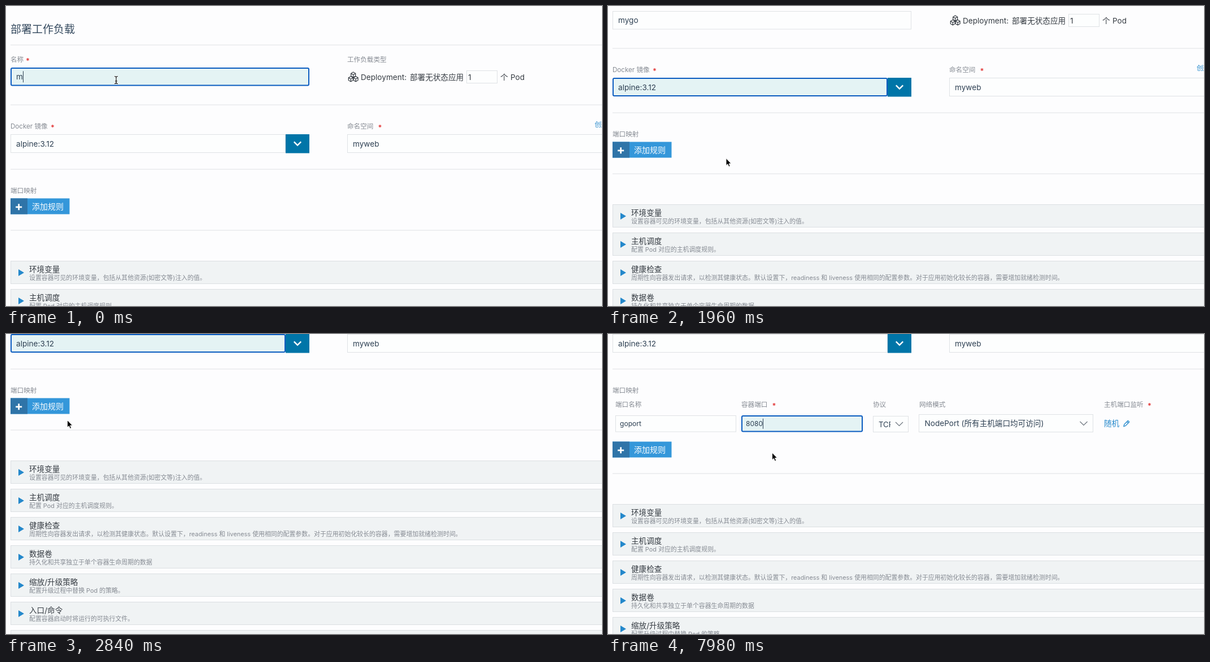
Animation, 1055 px wide and 531 px high, one loop 8000 ms. Source, as an HTML page:

```html
<!DOCTYPE html>
<html lang="zh-CN">
<head>
<meta charset="utf-8">
<title>部署工作负载</title>
<style>
html, body { margin: 0; width: 100%; height: 100%; overflow: hidden; background: #fdfdfe; }
svg { display: block; width: 1055px; height: 531px; }
text { font-family: Inter, "Noto Sans CJK SC", "Noto Sans CJK", sans-serif; white-space: pre; }
</style>
</head>
<body>
<svg id="stage" viewBox="0 0 1055 531"></svg>
<script>
const LOOP = 8000;
const INK = '#2e4053', DARK = '#363c43', GREY = '#868b93', BLUE = '#2488cb';
const LINE = '#dfe2e5', HINT = '#a7adb2';
const stage = document.getElementById('stage');

function add(parent, tag, attrs, content) {
  const el = document.createElementNS('http://www.w3.org/2000/svg', tag);
  for (const k in attrs) el.setAttribute(k, attrs[k]);
  if (content) el.textContent = content;
  parent.appendChild(el);
  return el;
}
// cy is the middle of the line of text
function label(parent, x, cy, size, content, fill = GREY) {
  return add(parent, 'text', { x, y: cy + size * 0.38, 'font-size': size, fill }, content);
}
function rect(parent, x, y, width, height, fill, stroke = 'none') {
  return add(parent, 'rect', { x, y, width, height, fill, stroke });
}
function path(parent, d, stroke, width, fill = 'none') {
  return add(parent, 'path', { d, stroke, 'stroke-width': width, fill });
}
const star = (parent, x, cy) =>
  add(parent, 'text', { x, y: cy + 7, 'font-size': 12.5, 'font-weight': 700, fill: '#e23b3b' }, '*');
const rule = (parent, y) => rect(parent, 8, y, 1047, 1, LINE);
const show = (el, on) => el.setAttribute('visibility', on ? 'visible' : 'hidden');

function field(parent, x, y, w, h, pad, size, hint) {
  const box = add(parent, 'rect', {});
  const hintText = hint ? label(parent, x + pad, y + h / 2, size, hint, HINT) : null;
  const text = label(parent, x + pad, y + h / 2, size, '', INK);
  const tall = size > 13 ? 20 : 18;
  const caret = rect(parent, 0, y + h / 2 - tall / 2, 1, tall, INK);
  return function ({ value, focus, hover, caretAt }) {
    const inset = focus ? 1 : 0.5;
    const look = {
      x: x + inset, y: y + inset, width: w - 2 * inset, height: h - 2 * inset,
      rx: focus ? 2 : 0, 'stroke-width': 2 * inset,
      fill: focus ? '#e4f3f4' : hover ? '#e9eaeb' : '#fdfefe',
      stroke: focus ? '#0b5cc0' : hover ? '#999b9d' : LINE
    };
    for (const k in look) box.setAttribute(k, look[k]);
    if (text.textContent !== value) text.textContent = value;
    if (hintText) {
      hintText.textContent = value ? '' : hint;
      hintText.setAttribute('fill', focus ? '#b9c4c7' : HINT);
    }
    const blinkOn = focus && caretAt >= 0;
    show(caret, blinkOn);
    if (blinkOn) {
      const run = caretAt > 0 ? text.getSubStringLength(0, caretAt) : 0;
      caret.setAttribute('x', Math.round(x + pad + run));
    }
  };
}

// Page
const page = add(stage, 'g', {});
label(page, 8, 41, 19, '部署工作负载', '#34495e');
rule(page, 68.5);
label(page, 8, 95, 11.6, '名称');
star(page, 35, 95);
const nameField = field(page, 8, 109, 529, 32.5, 10, 13.6);

label(page, 604, 95, 11.6, '工作负载类型');
function cube(cx, cy, r) {
  const dx = r * 0.87, h = r / 2;
  path(page, `M${cx} ${cy - r}l${dx} ${h}v${r}l${-dx} ${h}l${-dx} ${-h}v${-r}z` +
    `M${cx - dx} ${cy - h}l${dx} ${h}l${dx} ${-h}M${cx} ${cy}v${r}`, DARK, 1.2);
}
cube(614.7, 121.6, 4.6);
cube(610.3, 129.2, 4.6);
cube(619.1, 129.2, 4.6);
label(page, 628, 126, 13.6, 'Deployment:', DARK);
label(page, 715, 126, 13.6, '部署无状态应用', DARK);
rect(page, 815.5, 114.5, 54, 22, '#fdfefe', LINE);
label(page, 818, 126, 13.6, '1', DARK);
label(page, 875, 126, 13.6, '个', DARK);
label(page, 893, 126, 13.6, 'Pod', DARK);
rule(page, 174.5);

label(page, 8, 213, 11.6, 'Docker 镜像');
star(page, 79, 213);
const imageField = field(page, 8, 227, 487, 33, 10, 13.6);
rect(page, 495, 227, 42, 33.5, '#0075a8');
path(page, 'M509.8 240.3l6.2 6.2l6.2 -6.2', '#fff', 2.4);
label(page, 604, 213, 11.6, '命名空间');
star(page, 658.5, 213);
label(page, 1042, 210, 11.6, '创建新的命名空间', BLUE);
rect(page, 604.5, 227.5, 470, 32, '#fdfefe', LINE);
label(page, 614, 243.5, 13.6, 'myweb', INK);
rule(page, 288.5);
label(page, 8, 326.5, 11.6, '端口映射');

// Port rule row
const row = add(page, 'g', {});
[[13, '端口名称'], [236, '容器端口', 290.5], [469, '协议'], [551, '网络模式'], [878, '主机端口监听', 955]]
  .forEach(([x, s, mark]) => {
    label(row, x, 352, 11.6, s);
    if (mark) star(row, mark, 352);
  });
const portName = field(row, 13, 371, 214, 29.5, 8, 12.1, '例如: myport');
const portNumber = field(row, 236, 371, 215, 29.5, 8, 12.1, '例如: 8080');
rect(row, 469.5, 372.5, 62, 28, '#fdfefe', LINE);
add(add(row, 'clipPath', { id: 'cut' }), 'rect', { x: 470, y: 373, width: 30, height: 27 });
label(row, 479, 387, 13.2, 'TCP', INK).setAttribute('clip-path', 'url(#cut)');
path(row, 'M509 383l6.5 6.5l6.5 -6.5', '#68717a', 1.1);
rect(row, 550.5, 369.5, 308, 31, '#fdfefe', LINE);
label(row, 560.5, 385, 13.6, 'NodePort (所有主机端口均可访问)', INK);
path(row, 'M835.5 382l6.5 6.5l6.5 -6.5', '#68717a', 1.1);
label(row, 878, 385, 13.6, '随机', BLUE);
path(row, 'M913 390.5l.8 -3.4l6.6 -6.6l2.3 2.3l-6.6 6.6zM918.4 382.3l2.5 2.5', BLUE, 1.3);

// Everything below the port rules
const lower = add(page, 'g', {});
rect(lower, 8, 340.5, 104.5, 28, '#3497da');
rect(lower, 8, 340.5, 30, 28, '#2f74a8');
path(lower, 'M17.2 355.8h11M22.7 350.3v11', '#fff', 2.7);
label(lower, 46, 355, 14, '添加规则', '#fff');
rule(lower, 396.5);
[
  ['环境变量', '设置容器可见的环境变量，包括从其他资源(如密文等)注入的值。'],
  ['主机调度', '配置 Pod 对应的主机调度规则。'],
  ['健康检查', '周期性向容器发出请求，以检测其健康状态。默认设置下，readiness 和 liveness 使用相同的配置参数。对于应用初始化较长的容器，需要增加就绪检测时间。'],
  ['数据卷', '持久化和共享独立于单个容器生命周期的数据'],
  ['缩放/升级策略', '配置升级过程中替换 Pod 的策略。'],
  ['入口/命令', '配置容器启动时将运行的可执行文件。'],
  ['网络', '配置网络。']
].forEach(([title, note], i) => {
  const y = 451.5 + 50 * i;
  rect(lower, 8.5, y, 1060, 40, '#f0f3f4', '#dbdfe2');
  path(lower, `M22 ${y + 14.5}l10 6l-10 6z`, 'none', 0, BLUE);
  label(lower, 41, y + 14.5, 13.6, title, DARK);
  label(lower, 41, y + 29.7, 10.9, note);
});

// Pointers, each with its hot spot at 0,0
const pointers = {
  beam: add(stage, 'g', {}),
  arrow: add(stage, 'g', {}),
  hand: add(stage, 'g', {})
};
const beam = 'M-3 -6.5q3 0 3 2v9q0 2 -3 2M3 -6.5q-3 0 -3 2v9q0 2 3 2M-1.8 1.8h3.6';
path(pointers.beam, beam, '#fff', 2.6);
path(pointers.beam, beam, '#111', 1.2);
path(pointers.arrow, 'M.5 .5v13l2.9 -2.7l2 4.6l2.3 -1l-2 -4.4h4z', '#fff', 1, '#000');
path(pointers.hand, 'M-1.3 1q1.3 -2 2.6 0v5q1.5 -1.2 2.6 .2q1.5 -.8 2.5 .5q2 -.6 2.2 1.5v3l-1.6 4.3h-6.5' +
  'l-4 -5.7q-.6 -2.4 2.2 -.9z', '#000', 1, '#fff');

// Timelines: each entry holds from its time on
const scroll = [[0, 0], [1780, 22], [1870, 62], [1960, 100], [2040, 122], [2130, 148],
  [2220, 176], [2360, 201], [2480, 219], [2570, 227]];
const mouse = [[0, 195, 131, 'beam'], [630, 193, 138, 'beam'], [720, 186, 162, 'arrow'],
  [800, 175, 196, 'arrow'], [890, 166, 224, 'arrow'], [980, 160, 239, 'beam'], [1070, 159, 242.5, 'beam'],
  [1430, 168, 248, 'beam'], [1520, 195, 262, 'arrow'], [1600, 208.5, 269, 'arrow'],
  [2660, 196, 245, 'arrow'], [2750, 155, 196, 'arrow'], [2840, 108, 152, 'arrow'],
  [2930, 78, 132, 'hand'], [3010, 70, 128, 'hand'],
  [3370, 73, 131, 'arrow'], [3460, 84, 140, 'arrow'], [3550, 97, 150, 'beam'],
  [3640, 106, 156, 'beam'], [3720, 110, 158, 'beam'], [3800, 111, 158, 'beam'],
  [6660, 135, 188, 'arrow'], [6750, 196, 232, 'arrow'], [6840, 262, 204, 'arrow'],
  [6930, 288, 163, 'beam'], [7100, 289, 198, 'arrow'], [7980, 290, 209.5, 'arrow']];
const focus = [[0, 'name'], [1340, 'image'], [3280, 'port'], [7010, 'number']];
// time, value, caret index (-1 while blinked off)
const nameType = [[0, 'm', 1], [90, 'my', 2], [270, 'myg', 3], [450, 'mygo', 4], [980, 'mygo', -1]];
const imageType = [[0, 'alpine:3.12', 11], [1870, 'alpine:3.12', -1], [2360, 'alpine:3.12', 11],
  [2840, 'alpine:3.12', -1]];
const portType = [[0, '', 0], [3800, '', -1], [4250, '', 0], [4520, 'p', 1], [4610, 'po', 2],
  [4790, 'por', 3], [4880, 'port', 4], [5420, 'port', -1], [5510, 'port', 0], [5770, 'mport', 1],
  [6220, 'port', 0], [6300, 'gport', 1], [6390, 'goport', 2]];
const numberType = [[0, '', 0], [7540, '8', 1], [7630, '80', 2], [7720, '808', 3], [7800, '8080', 4]];

function at(line, t) {
  let now = line[0];
  for (const step of line) if (step[0] <= t) now = step;
  return now;
}

function draw(t) {
  const top = at(scroll, t)[1];
  const active = at(focus, t)[1];
  const [, mx, my, kind] = at(mouse, t);
  const open = t >= 3280;
  const put = (set, key, line, hover) => {
    const [, value, caretAt] = at(line, t);
    set({ value, caretAt, focus: active === key, hover });
  };
  page.setAttribute('transform', `translate(0 ${-top})`);
  lower.setAttribute('transform', `translate(0 ${open ? 77 : 0})`);
  row.setAttribute('display', open ? 'inline' : 'none');

  put(nameField, 'name', nameType, false);
  put(imageField, 'image', imageType, mx < 495 && my + top > 227 && my + top < 260);
  if (open) {
    put(portName, 'port', portType, false);
    put(portNumber, 'number', numberType, mx > 236 && mx < 451 && my > 144 && my < 173);
  }
  for (const k in pointers) show(pointers[k], k === kind);
  pointers[kind].setAttribute('transform', `translate(${mx} ${my})`);
}

const start = performance.now();
function tick() {
  draw((performance.now() - start) % LOOP);
  requestAnimationFrame(tick);
}
tick();
</script>
</body>
</html>
```
